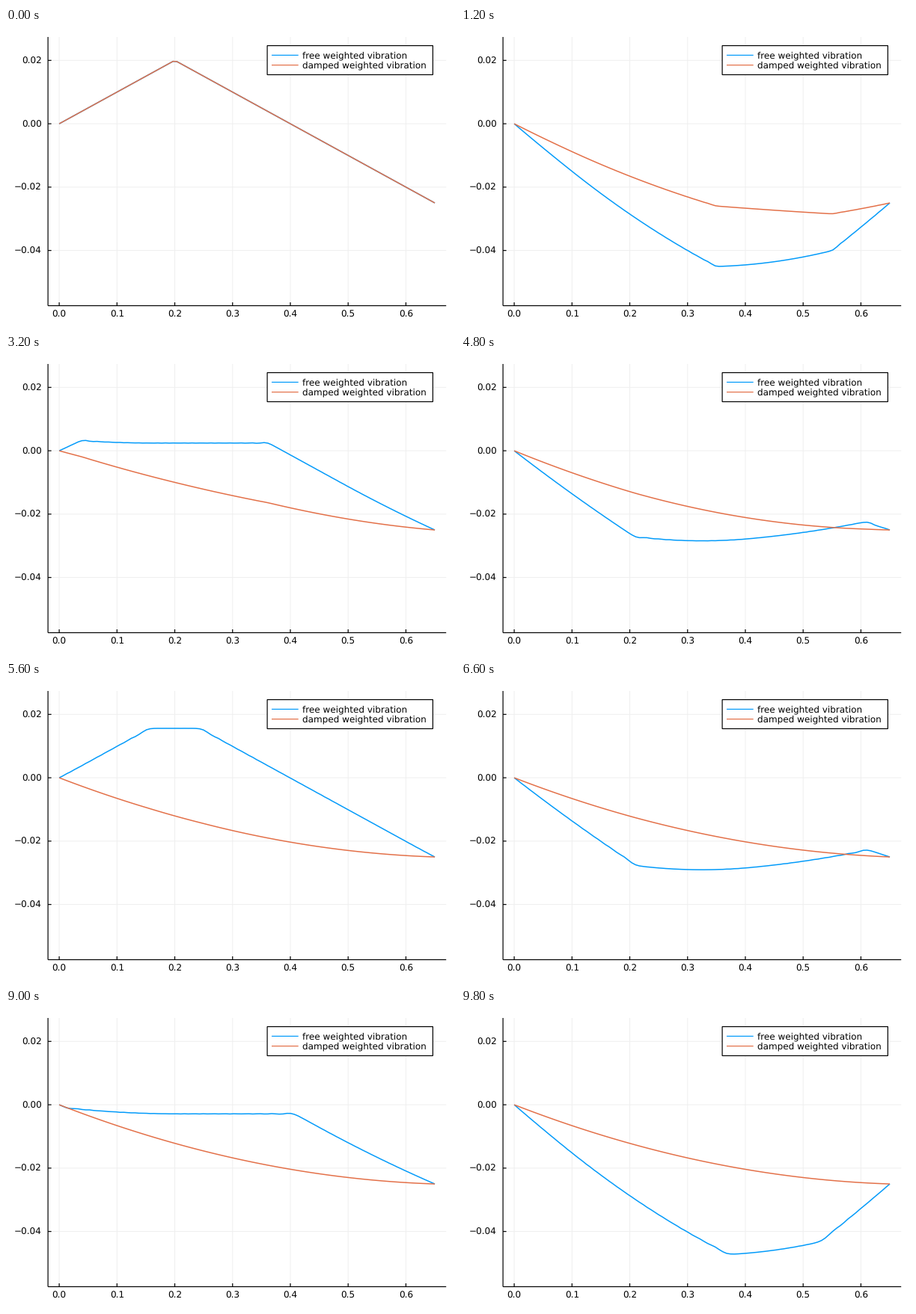
Animation, 600 px wide and 400 px high, one loop 10 s. Source, as a matplotlib script:

```python
import numpy as np
import matplotlib.pyplot as plt
from matplotlib.animation import FuncAnimation
from matplotlib.patches import Rectangle

W, H, DPI = 600, 400, 100
FRAMES, INTERVAL = 50, 200
BLUE, ORANGE = "#009afa", "#e36f47"
FONT_PX = 12

# String: fixed ends at different heights, plucked, hanging under gravity
LENGTH, DROP = 0.65, -0.025
PLUCK_X, PLUCK_Y = 0.2, 0.02
SPEED, GRAVITY, DAMPING = 10.0, 10.0, 33.0
POINTS, SUBSTEPS = 100, 14
DT = 0.00912 / SUBSTEPS

plt.rcParams["font.family"] = "DejaVu Sans"
plt.rcParams["text.hinting"] = "none"
plt.rcParams["toolbar"] = "None"


def px(size):
    """Pixels to points."""
    return size * 72 / DPI


def to_x(x):
    return 71.1 + 772.2 * x


def to_y(y):
    return 128.1 - 4238 * y


def simulate(damping):
    """Leapfrog solution of u_tt = c^2 u_xx - g - damping u_t, one row per frame."""
    x = np.linspace(0, LENGTH, POINTS)
    ratio = (SPEED * DT / (x[1] - x[0])) ** 2
    drag = damping * DT / 2
    u = np.interp(x, [0, PLUCK_X, LENGTH], [0, PLUCK_Y, DROP])
    prev = u
    rows = [u]
    for _ in range(FRAMES - 1):
        for _ in range(SUBSTEPS):
            push = ratio * (u[2:] - 2 * u[1:-1] + u[:-2]) - GRAVITY * DT**2
            new = u.copy()
            new[1:-1] = (2 * u[1:-1] - (1 - drag) * prev[1:-1] + push) / (1 + drag)
            prev, u = u, new
        rows.append(u)
    return x, np.array(rows)


grid_x, free = simulate(0)
_, damped = simulate(DAMPING)

fig = plt.figure(figsize=(W / DPI, H / DPI), dpi=DPI, facecolor="white")
ax = fig.add_axes([0, 0, 1, 1])
ax.set_xlim(0, W)
ax.set_ylim(H, 0)
ax.axis("off")


def stroke(xs, ys, color, width, z=2):
    return ax.plot(xs, ys, color=color, lw=px(width), zorder=z,
                   solid_capstyle="butt", snap=False)[0]


def label(x, y, text, align):
    ax.text(x, y, text, ha=align, va="baseline", fontsize=px(FONT_PX),
            color="black", zorder=6)


LEFT, RIGHT, TOP, BOTTOM = 56.1, 588.2, 12, 371.5

for i in range(7):
    x = to_x(i / 10)
    stroke([x, x], [TOP, BOTTOM], "#efefef", 1, 1)
    stroke([x, x], [BOTTOM, BOTTOM - 4.5], "black", 1.2, 4)
    label(x, 387.3, f"{i / 10:.1f}", "center")

for i in range(-2, 2):
    y = to_y(i * 0.02)
    stroke([LEFT, RIGHT], [y, y], "#efefef", 1, 1)
    stroke([LEFT, LEFT + 4.5], [y, y], "black", 1.2, 4)
    label(48, y + 4.3, f"{i * 0.02:.2f}".replace("-", "\u2212"), "right")

stroke([LEFT, LEFT], [TOP, BOTTOM], "black", 1.2, 4)
stroke([LEFT, RIGHT], [BOTTOM, BOTTOM], "black", 1.2, 4)

ax.add_patch(Rectangle((349.1, 23.6), 221.3, 38.9, facecolor="white",
                       edgecolor="black", lw=px(1.2), zorder=5, snap=False))
for y, color, name in [(36.4, BLUE, "free weighted vibration"),
                       (49.6, ORANGE, "damped weighted vibration")]:
    stroke([355, 390.7], [y, y], color, 1.2, 6)
    label(396, y + 4, name, "left")

free_line = stroke([], [], BLUE, 1.5, 2)
damped_line = stroke([], [], ORANGE, 1.5, 3)


def draw(i):
    free_line.set_data(to_x(grid_x), to_y(free[i]))
    damped_line.set_data(to_x(grid_x), to_y(damped[i]))
    return free_line, damped_line


anim = FuncAnimation(fig, draw, frames=FRAMES, interval=INTERVAL,
                     init_func=lambda: draw(0), repeat=True, repeat_delay=0)
plt.show()
```
